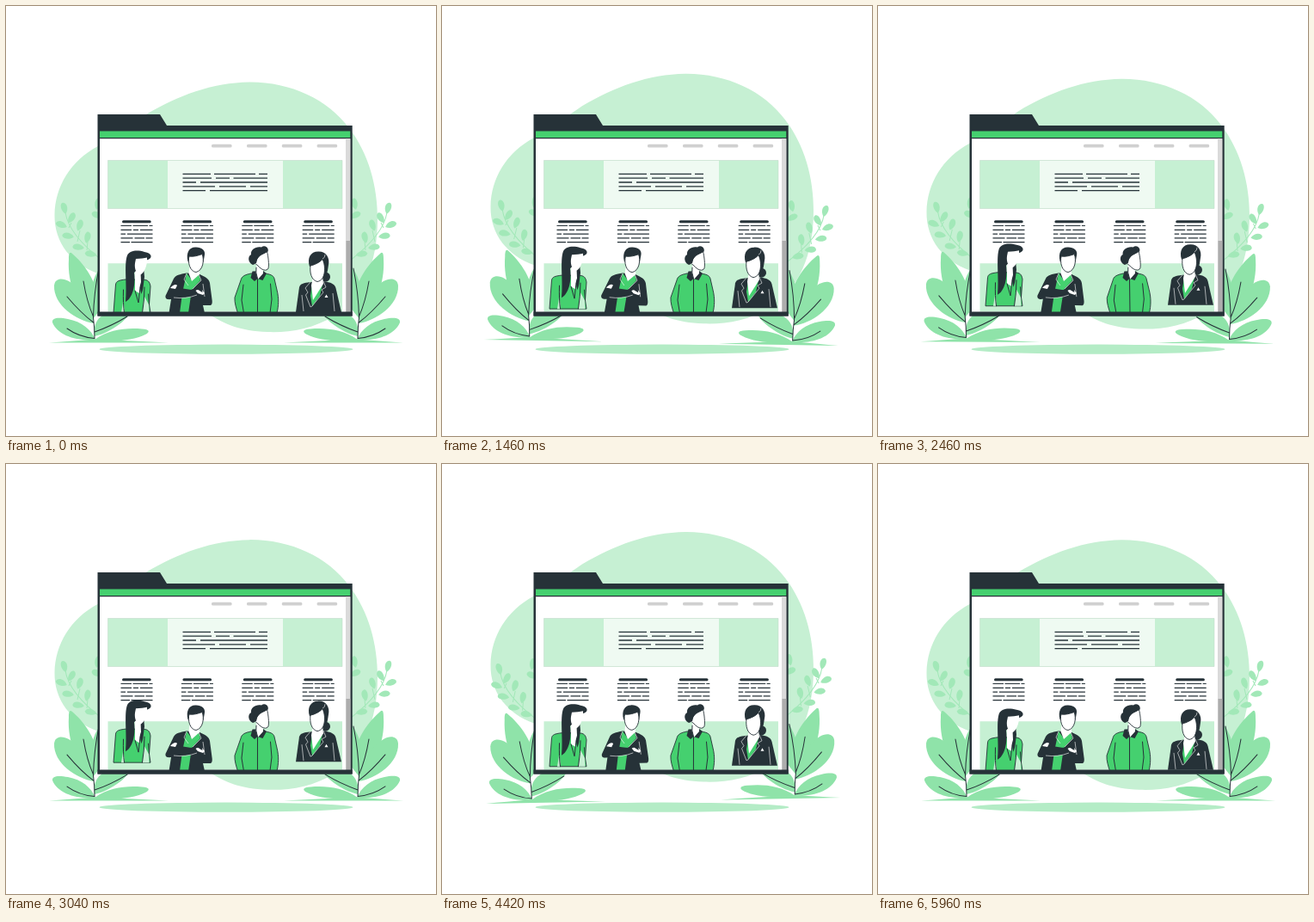
Animation of 500x500 px, one loop 6 s. Source, as an HTML page:

```html
<!DOCTYPE html>
<html lang="en">
<head>
<meta charset="utf-8">
<title>Team page</title>
<style>
html, body { margin: 0; width: 100%; height: 100%; overflow: hidden; background: #fff; }
svg { display: block; width: 100%; height: 100%; }
.dark { fill: #263238; }
.green { fill: #45d06f; }
.pale { fill: #c6f0d3; }
.white { fill: #fff; }
.leaf { fill: #8fe3a9; }
.sprig { fill: #a2e8b8; }
.line { fill: none; stroke: #263238; stroke-width: 1; stroke-linecap: round; stroke-linejoin: round; }
.edge { stroke: #263238; stroke-width: .9; stroke-linejoin: round; }
.thin { fill: none; stroke: #fff; stroke-width: .6; }
</style>
</head>
<body>
<svg viewBox="0 0 500 500">
  <path id="blob" class="pale" d="M283 88.4C330 88 374 108 399 142C422 172 432 210 432 248C432 300 415 338 382 360C357 376 328 380 304 379C272 378 255 370 235 358C200 336 150 325 107 311C76 300 56 275 56.5 243C57 210 75 180 107 163C125 153 145 138 163 126C200 104 240 89 283 88.4Z"/>

  <g id="plants">
    <g id="plant">
      <g id="sprig" class="sprig"></g>
      <path class="leaf" d="M50 391.5Q72 390 103 387.5Q150 389.5 189 391.5Z"/>
      <path class="leaf" d="M101 366C84 350 71 325 73 294C73 288 74 285 77 288C90 299 108 322 106 345Z"/>
      <path class="leaf" d="M102 369C82 366 55 348 56 325C57 316 66 316 73 320C90 330 99 349 102 369Z"/>
      <path class="leaf" d="M104 388C82 390 60 383 54 368C53 362 62 362 72 364C88 367 99 376 104 388Z"/>
      <path class="leaf" d="M103 388C120 376 140 374 158 375.500C167 376 168 379 162 382C148 389 125 391 103 388Z"/>
      <path class="leaf" d="M103 384C100 365 112 352 145 352C146 362 122 380 103 384Z"/>
      <path class="leaf" d="M101 364C95 335 100 312 114 300L120 340Z"/>
      <path class="line" d="M103 386.500Q103 374 101.500 362Q102 335 108 305M90 320Q94 344 101.500 361M71 338Q87 357 101.700 368M71 375Q85 385 103 386.500M103 379Q123 372 141 361"/>
    </g>
    <use href="#plant" transform="matrix(-1 0 0 1 512 0)"/>
  </g>

  <ellipse cx="256" cy="399.200" rx="147.500" ry="5.600" fill="#b4ecc6"/>

  <path class="dark" d="M106.500 126H179L187 139H402.700V360.500H106.500Z"/>
  <path class="green" d="M109 145.500H400.300V153H109Z"/>
  <path class="white" d="M109 154.300H400.300V357H109Z"/>
  <path fill="#dadada" d="M395 154.300H400.300V357H395Z"/>
  <path fill="#adadad" d="M395.500 273H400.300V357H395.500Z"/>
  <path stroke="#d0d0d0" stroke-width="3.800" stroke-linecap="round" d="M240.800 162.700h20M281.800 162.700h20M322.600 162.700h20M363.400 162.700h20"/>
  <path class="pale" d="M118.500 179.500H391V235.500H118.500ZM118.500 299.300H391V355.500H118.500Z"/>
  <path fill="#effaf2" d="M188 179.500H322V235.500H188Z"/>
  <path fill="none" stroke="#c4dccc" stroke-width=".6" d="M118.500 179.500H391V235.500H118.500Z"/>
  <g id="copy" fill="none" stroke="#263238"></g>

  <g id="woman1">
    <path class="green edge" d="M139 318C131 319 128 320 127.500 324L125 357H168L166.500 347L168 326C167 320 165 318.500 159 318Z"/>
    <path class="pale" d="M136.500 341L138 357H134ZM160.500 337L158.500 357H166.500L166 347Z"/>
    <path class="white" d="M150 306H158L159 318L155 334L150 331Z"/>
    <path class="line" d="M136.500 330Q136 346 137.500 357M161 327Q161 342 158.500 357M150 331L154 345L157 318M166.500 347L165.500 335"/>
    <path class="dark" d="M139 344C141 325 137 300 141 290C144 284 153 283.500 161 286C167 287 170 290 168 293C165 296 161 295 159.500 299L161 315C159 330 160 328 157.500 335C155 327 155 315 154 305L149 310C151 325 147 340 139 344Z"/>
    <path class="white" d="M151 294C156 294 161 293 164 292.500C165 301 160 312 156 312.500C152 312 149 306 150 299Z"/>
    <path class="white" d="M150 309H156.500L157 321Q154 333 151 331Z"/>
  </g>

  <g id="man1">
    <path class="dark" d="M210 310.500C202 312 197 313 195 317L185.500 337C185 341 188 341.500 192 341L189.500 357H231L229 348H238C240 347 240 344 239.500 341L237 322C236 317 232 315 224 311.500Z"/>
    <path class="green" d="M210 310.500L216 319L224 311.500L226 319L216 330L212 357H202L205 334Z"/>
    <path class="dark" d="M192 330C200 325 210 331 222 330L226 337L200 340Z"/>
    <path class="white" d="M213.500 303H225V312L216 320L212.500 311Z"/>
    <path class="white" d="M191 328C194 324 198 323 199 325L197 329ZM220.500 331Q223 329 225 331L230 334L229 336L223 334ZM228 330L231 334L229 336Z"/>
    <path class="thin" d="M210 311L207 318L212 325M224 312L227 319L217 329M229 323L231 338M195 339Q209 341 222 336"/>
    <path class="dark" d="M211.500 297C209 287 213 280.500 220 280.500C227 280 232 284 231 289L229.500 298H213Z"/>
    <path class="white edge" d="M213 291C218 292 224 290 228 288.500C231 295 229 308 221 309.500C214 309 211 298 213 291Z"/>
  </g>

  <g id="man2">
    <path class="green edge" d="M285 311C278 312.500 274 314 273 319L266 339C265.500 345 268 352 269.500 357H315C317 349 317.500 340 315 330L312 317C311 313 307 312 301 311Z"/>
    <path class="line" d="M292.500 318V357M276 324L274 342L276.500 357M307.500 323L309 341L307 357"/>
    <path class="dark" d="M286.500 308.500L284.500 316L289 320L292.500 317L298.500 319L303 311L299 308Z"/>
    <path class="white" d="M291 301H299V311L292.800 318L290.500 310Z"/>
    <path class="line" d="M291 304L290.800 310L292.800 318"/>
    <path class="dark" d="M287 301C281 298 281 291 285 289C284 283 291 279 297 280.500C300 278 304 280 304.500 282.500C306 286 302 289 297 290L292 299Z"/>
    <path class="white edge" d="M296 289C299 288 302 287 303.500 285.500C305 291 306 301 305 305C303 309 297 307 293 302L290.500 300C287 299 288 294 292 294Z"/>
    <path class="dark" d="M287 299L291 299L293 292L298 289L303 286L299 283L289 287Z"/>
  </g>

  <g id="woman2">
    <circle class="dark" cx="371.500" cy="315" r="5.500"/>
    <path class="dark" d="M354 321C346 322 342 323 341 327L337 356H390L383.500 328C382 323 378 321.500 369 320Z"/>
    <path class="green" d="M356 324L368 324L365 337L356 349L354 337Z"/>
    <path class="white" d="M357 314H368L369 323L357 342L355 325Z"/>
    <path class="thin" d="M354 321L348 328L351 333L348.500 336L354 350L356 349L369 333L367 330L372 327L369 320M344 336L346 355M380 334L382 355"/>
    <path class="white" d="M370.500 339L372.500 335.500L374.500 339Z"/>
    <path class="dark" d="M353 303C350 293 354 285.500 363 285.500C372 285 377 293 375 301C374 307 374 311 371 314L367 302Z"/>
    <path class="white edge" d="M354 302C359 301 365 298 368 294.500C372 302 372 319 362 320.500C355 319 353 310 354 302Z"/>
    <path class="thin" d="M368 294Q371 293 371 289"/>
  </g>

  <path class="dark" d="M106.500 355.500H402.700V360.500H106.500Z"/>
</svg>
<script>
const $ = id => document.getElementById(id);

// x, y, angle of each small leaf
const leaves = [
  [68, 235, -12], [76.5, 246.500, 35], [64.5, 254, -65], [86, 255, 22], [72, 267, -78],
  [95, 269, 15], [84, 280, -80], [98.5, 288, -75], [107, 230, 15], [106, 243, -60]
];
$("sprig").innerHTML = leaves.map(([x, y, a]) =>
  `<path transform="translate(${x} ${y}) rotate(${a})" d="M0 7C-5 3 -5 -6 -1 -6.500C4 -6 5 2 0 7Z"/>`).join("") +
  '<path fill="none" stroke="#a2e8b8" d="M69 240Q73 266 112 296M76 252L73 258M86 261L83 274M95 274L94 284"/>';

// Each row lists start and end pairs along one text line
const rows = (x, y, gap, lines) => lines.map((row, i) => {
  let d = "";
  for (let k = 0; k < row.length; k += 2) d += `M${x + row[k]} ${y + i * gap}H${x + row[k + 1]}`;
  return d;
}).join("");
const banner = [[0, 32.500, 36.500, 84.500, 88.500, 98.500], [0, 33.500, 38.500, 54.500, 59, 98.500],
  [0, 15.500, 20.500, 98.500], [0, 37.500, 42.500, 73.500, 78.500, 98.500], [0, 26.500, 31.500, 98.500]];
const bio = [[0, 12.500, 14, 31.500, 33, 37], [0, 12.500, 14.500, 20.500, 22.500, 37],
  [0, 5.500, 7.500, 37], [0, 14, 16, 27.500, 29, 37], [0, 10.500, 12, 37]];
let copy = `<path stroke-width="1.300" d="${rows(205.500, 195.400, 4.800, banner)}"/>`;
for (let i = 0; i < 4; i++) {
  const x = 133.500 + i * 70.400;
  copy += `<path stroke-width="1.200" d="${rows(x, 255.500, 4.800, bio)}"/>
    <path stroke-width="3" stroke-linecap="round" d="M${x + 3} 250.700h30.700"/>`;
}
$("copy").innerHTML = copy;

const phase = (t, period) => t % period / period;
const rise = u => -10 * (1 - Math.abs(1 - 2 * u));
const sway = u => u < .25 ? 4 * u : u < .75 ? 2 - 4 * u : 4 * u - 4;
const float = (id, u) => $(id).setAttribute("transform", `translate(0 ${rise(u)})`);
const wind = (id, u, x, y) => $(id).setAttribute("transform", `rotate(${sway(u)} ${x} ${y})`);

const start = performance.now();
function draw() {
  const t = performance.now() - start, slow = phase(t, 6000), fast = phase(t, 3000);
  float("blob", fast);
  float("woman1", slow);
  float("woman2", slow);
  wind("plants", slow, 256, 310);
  wind("man1", slow, 213, 318);
  wind("man2", fast, 291.500, 317);
  requestAnimationFrame(draw);
}
draw();
</script>
</body>
</html>
```
